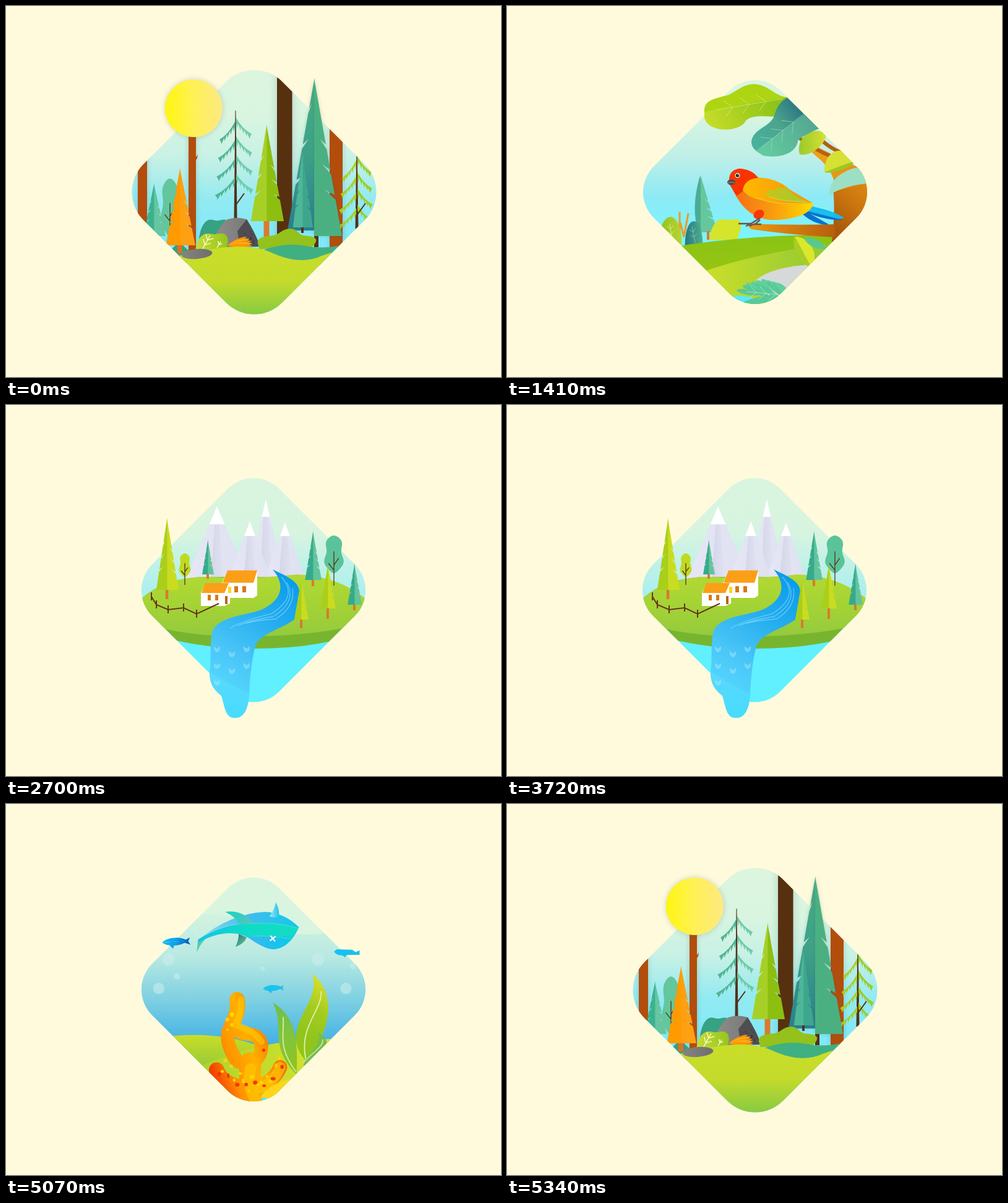
Write an HTML page with a canvas that moves like this. It is 800 px wide and 600 px high and loops after 5.7 s.

```html
<!DOCTYPE html>
<html lang="en">
<head>
<meta charset="utf-8">
<title>Landscapes</title>
<style>
html, body { margin: 0; width: 100%; height: 100%; overflow: hidden; background: #fffadc; }
canvas { display: block; }
</style>
</head>
<body>
<canvas id="stage" width="800" height="600"></canvas>
<script>
const g = document.getElementById('stage').getContext('2d');
const LOOP = 5700, STEP = 30, STEPS = 10, STARTS = [1170, 2460, 3720, 5070];
const SMALL = 0.2, NEAR = 0.917;
const BARK = '#b24d0c', DARK = '#55301a', WOOD = '#d97a30';

// ---- drawing helpers ----
function lin(x0, y0, x1, y1, ...colors) {
  const grad = g.createLinearGradient(x0, y0, x1, y1);
  colors.forEach((c, i) => grad.addColorStop(i / (colors.length - 1), c));
  return grad;
}
const across = (a, b, ...colors) => lin(a, 0, b, 0, ...colors);
const down = (a, b, ...colors) => lin(0, a, 0, b, ...colors);

function shape(d, fill) {
  g.fillStyle = fill;
  g.fill(new Path2D(d));
}
function line(d, color, width = 1) {
  g.strokeStyle = color;
  g.lineWidth = width;
  g.stroke(new Path2D(d));
}
function rect(x, y, w, h, fill) {
  g.fillStyle = fill;
  g.fillRect(x, y, w, h);
}
function oval(x, y, rx, ry, fill, turn = 0) {
  g.fillStyle = fill;
  g.beginPath();
  g.ellipse(x, y, rx, ry, turn, 0, 7);
  g.fill();
}
function inside(s, draw) {
  g.save();
  g.clip(s.frame);
  draw();
  g.restore();
}
function withShadow(blur, draw) {
  g.save();
  g.shadowColor = 'rgba(40,90,80,.24)';
  g.shadowBlur = blur;
  draw();
  g.restore();
}
function random(seed) {
  return () => (seed = (seed * 16807) % 2147483647) / 2147483647;
}

// ---- plants ----
function firSide(x, top, bot, edge, cuts, shift, fill) {
  const w = edge - x, h = bot - top;
  g.beginPath();
  g.moveTo(x, top);
  for (let i = 0; i < cuts; i++) {
    const t = shift + i * (0.9 - shift) / cuts;
    g.lineTo(x + w * t, top + h * t);
    g.lineTo(x + w * t * 0.5, top + h * (t - 0.035));
    g.lineTo(x + w * (t + 0.03), top + h * (t + 0.03));
  }
  g.lineTo(edge, bot);
  g.lineTo(x, bot);
  g.fillStyle = fill;
  g.fill();
}
function fir(x, top, bot, half, cl, cr, trunk, foot, bark = WOOD) {
  rect(x - trunk / 2, bot - 1, trunk, foot - bot + 1, bark);
  firSide(x, top, bot, x + half, 3, 0.45, cr);
  firSide(x + 0.4, top, bot, x - half * 0.9, 3, 0.35, cl);
}
const tealFir = (x, top, bot, half, foot) => fir(x, top, bot, half, '#36aa8b', '#62c39d', 4, foot);
const limeFir = (x, top, bot, half, foot) => fir(x, top, bot, half, '#a9cf1a', '#cadc20', 4, foot);

function bough(x, y, dx, dy, fill) {
  const teeth = 5;
  g.beginPath();
  g.moveTo(x, y);
  g.quadraticCurveTo(x + dx * 0.4, y + dy * 0.7, x + dx, y + dy);
  for (let i = teeth - 1; i >= 0; i--) {
    const f = i / teeth, px = x + dx * f, py = y + dy * f;
    g.lineTo(px + dx * 0.11, py + 9);
    g.lineTo(px + dx * 0.08, py + 17 - f * 5);
    g.lineTo(px, py + 9);
  }
  g.fillStyle = fill;
  g.fill();
}
function pine(x, top, foot, gap, reach, cl, cr) {
  shape(`M${x - 0.5} ${top}h1l2 ${foot - top}h-5z`, DARK);
  for (let i = 0; i < 4; i++) {
    bough(x - 1, top + 18 + i * gap, -reach - i * 2.4, 29, cl);
    bough(x + 1, top + 12 + i * gap, reach + i * 0.8, 26, cr);
  }
  line(`M${x + 1} ${foot - 23}l13 -18`, DARK, 2);
}
function roundTree(x, top, w, h, fill, foot) {
  g.beginPath();
  for (let a = 0; a < 6.28; a += 0.15) {
    const v = Math.sin(a), wave = 0.84 + 0.16 * Math.cos(5 * v - 2.4);
    g.lineTo(x + w / 2 * Math.cos(a) * wave, top + h / 2 * (1 + v));
  }
  g.fillStyle = fill;
  g.fill();
  const t = foot - top - h * 0.42;
  line(`M${x} ${foot}v${-t}m0 ${t * 0.55}l${-t * 0.16} ${-t * 0.2}m${t * 0.16} ${t * 0.05}l${t * 0.14} ${-t * 0.2}`, DARK, 1.3);
}
// lobed half-oval standing on its base; lean moves the top sideways
function bush(x, base, w, h, fill, lobes = 3, lean = 0) {
  g.beginPath();
  for (let i = 0; i <= 40; i++) {
    const a = Math.PI * i / 40, r = 0.9 - 0.1 * Math.cos(2 * lobes * a), up = Math.sin(a) * r;
    g.lineTo(x - w / 2 * Math.cos(a) * r + lean * up, base - h * up);
  }
  g.fillStyle = fill;
  g.fill();
}
// leaf along an axis, with its own bulge and fill on each side
function leaf(x0, y0, x1, y1, a, b, fa, fb = fa) {
  const dx = x1 - x0, dy = y1 - y0, len = Math.hypot(dx, dy);
  for (const [bulge, fill] of [[a, fa], [-b, fb]]) {
    const nx = dy / len * bulge, ny = -dx / len * bulge;
    g.beginPath();
    g.moveTo(x0, y0);
    g.bezierCurveTo(x0 + dx * 0.2 + nx, y0 + dy * 0.2 + ny, x0 + dx * 0.8 + nx, y0 + dy * 0.8 + ny, x1, y1);
    g.fillStyle = fill;
    g.fill();
  }
}
function veins(x0, y0, x1, y1, count, size, color, width = 0.8) {
  const dx = x1 - x0, dy = y1 - y0, len = Math.hypot(dx, dy), ux = dx / len * size, uy = dy / len * size;
  let d = `M${x0} ${y0}L${x1} ${y1}`;
  for (let i = 1; i <= count; i++) {
    const f = i / (count + 1), p = `M${x0 + dx * f} ${y0 + dy * f}`;
    d += `${p}l${ux - uy} ${uy + ux}${p}l${ux + uy} ${uy - ux}`;
  }
  line(d, color, width);
}
function kelp(x, y, tipX, tipY, left, right, fill, vein) {
  const h = y - tipY, mid = (tipX + right) / 2, c = (left + right) / 2;
  shape(`M${tipX} ${tipY}C${right} ${tipY + h * 0.2} ${right} ${tipY + h * 0.6} ${x} ${y}C${left} ${tipY + h * 0.6} ${mid} ${tipY + h * 0.35} ${tipX} ${tipY}`, fill);
  line(`M${mid - 4} ${tipY + h * 0.2}C${mid} ${tipY + h * 0.4} ${c - 12} ${tipY + h * 0.6} ${x - 1} ${y - 5}`, vein, 2);
}

// ---- forest ----
function forest(s) {
  inside(s, () => {
    rect(200, 100, 400, 400, down(110, 380, '#dcf5df', '#d9f5e0', '#c8f1e5', '#93eaf1', '#7fe9f9'));
    withShadow(14, () => rect(438, 90, 24.5, 292, '#57300f'));
    withShadow(10, () => {
      rect(213, 240, 15, 110, BARK);
      rect(295, 205, 12, 190, BARK);
      rect(523, 190, 21, 200, BARK);
    });
    shape('M306 246l4 -6l-1 6l-3 5z', BARK);
    roundTree(265, 279, 33, 94, '#63c69c', 372);
    fir(239, 287, 372, 19, '#3bb28e', '#65c6a0', 4, 380, DARK);
    bush(333, 392, 58, 56, '#36a183', 2, 10);
    bush(280, 415, 70, 30, '#3a9e7d');
    fir(281, 262, 387, 25, '#ff9a00', '#ff9f12', 8, 400, '#df6f26');
    pine(371, 169, 344, 30, 25, '#4fb594', '#6fcba8');
    fir(421, 192, 348, 28, '#a6d026', '#8cbf10', 9, 384);
    pine(567, 231, 360, 26, 23, '#a9cd20', '#9dcb1d');
    rect(498, 370, 7, 20, DARK);
  });
  withShadow(6, () => {
    firSide(498.5, 117, 363, 455, 3, 0.2, down(120, 365, '#44ad86', '#3ea087', '#2a7d8f'));
    firSide(498, 117, 372, 543, 3, 0.42, '#4ab081');
  });
  fir(479, 236, 358, 17, '#4db797', '#3ea68d', 4, 367, DARK);
  inside(s, () => {
    shape('M328 392Q346 352 358 345Q373 340 389 345L411 389Z', across(335, 395, '#8e8e8c', '#777'));
    shape('M389 345Q402 365 411 389H378L374 364z', '#504d50');
    const rnd = random(7);
    for (let i = 0; i < 16; i++) oval(380 + rnd() * 22, 364 + rnd() * 22, 0.7, 0.7, '#222');
    bush(451, 393, 105, 33, '#94c11b', 3, 8);
    shape('M415 395Q450 382 485 388Q510 394 545 386V420H415z', '#3fb081');
    bush(329, 402, 60, 41, across(305, 360, '#c6dd39', '#92c51b'), 2, 10);
    veins(317, 394, 330, 371, 2, 7, '#fff8d8', 1.4);
    veins(341, 391, 347, 381, 1, 4, '#fff8d8', 1.4);
    for (let i = 0; i < 5; i++) {
      const a = 0.75 - i * 0.2;
      leaf(359, 387, 359 + 41 * Math.cos(a) - i * 0.5, 387 - 20 * Math.sin(a), 4, 4, i % 2 ? '#ffb01f' : '#ff9500');
    }
    shape('M250 410Q310 397 340 392Q390 384 425 397Q475 421 510 404Q530 396 560 394V510H250z', down(390, 500, '#c9de29', '#c4db2b', '#86ca43'));
    oval(308.5, 401, 25, 8, across(284, 333, '#868481', '#706e6d'), -0.08);
  });
  withShadow(10, () => oval(303.5, 165.5, 46.5, 46.5, across(257, 350, '#fff60f', '#fff156', '#fde983')));
}

// ---- bird ----
function bird(s) {
  inside(s, () => {
    rect(210, 110, 380, 380, down(120, 370, '#daf5e1', '#d6f4e2', '#bfefe8', '#8eeaf5', '#7bf4ff'));
    line('M279 372V333M286 374l-6 -24M286 372l7 -37', '#ee9c22', 3);
    bush(264, 386, 46, 45, across(246, 284, '#8ec21d', '#bdd334'), 1);
    veins(267, 378, 263, 352, 2, 5, '#e5f3a0');
    shape('M312 274Q296 330 310 366H326z', '#4aad93');
    firSide(313, 274, 366, 340, 3, 0.45, '#66c79c');
    rect(323, 364, 4, 14, WOOD);
    bush(302, 388, 36, 40, across(285, 318, '#22747e', '#55b18e'), 1);
    veins(304, 383, 299, 357, 2, 5, '#83d0b1');
    bush(349, 378, 56, 40, '#d5e52b', 2, 12);
    // meadow
    shape('M210 400Q360 370 520 370H590V500H210z', down(370, 435, '#8ac414', '#98c414'));
    shape('M310 432Q400 400 515 386V500H310z', across(330, 490, '#c9de2a', '#98cb32'));
    shape('M403 443Q430 420 500 418V480H430z', '#d6d9da');
    shape('M350 471Q390 462 415 482H360z', '#57eafa');
    // trunk and foliage
    shape('M525 382Q531 330 527 297Q533 277 585 262V390z', lin(520, 350, 585, 280, '#a9570b', '#c9740f', '#e08c12'));
    shape('M528 300Q535 278 508 250L476 222H490L585 270V285z', lin(480, 225, 580, 290, '#f0a51c', '#e38a12'));
    line('M468 210Q496 232 524 243M498 206Q517 229 545 239', '#b8600e', 6);
    shape('M386 352Q460 355 530 353V374Q455 370 395 361z', across(390, 530, '#ed9911', '#b65f0c'));
    shape('M520 306Q522 282 541 271Q560 258 583 261V287Q546 290 520 306z', '#9be0c4');
    leaf(473, 240, 516, 206, 25, 14, across(473, 515, '#9bcb28', '#d5df35'));
    leaf(513, 269, 566, 249, 34, 8, '#d5e134', '#9bc821');
    leaf(465, 373, 492, 423, 22, 14, '#dbe72c', '#a8ce26');
    leaf(480, 375, 516, 392, 8, 9, '#58c98f');
    // fern
    for (let i = 0; i < 7; i++) {
      oval(389 + i * 9, 463 - (i % 2) * 5, 18, 4, '#58c997', 0.2 + i * 0.1);
      oval(397 + i * 8, 451 + Math.abs(i - 3) * 2, 5, 13, '#61cf9e', -0.85);
    }
    shape('M381 479Q420 462 458 470V485H380z', '#58c997');
    veins(450, 468, 387, 462, 3, 11, '#b0ecc8');
  });
  // large leaves
  shape('M319 174C317 151 337 150 358 144C376 135 387 122 409 128C425 132 433 145 453 148L432 179C411 178 389 176 383 190C365 207 315 202 319 174z', lin(325, 190, 432, 150, '#c6dc29', '#8cc416'));
  shape('M319 171C318 151 337 150 358 144C376 135 387 122 409 128C425 132 433 145 453 148Q382 157 319 171z', '#aed512');
  veins(445, 150, 338, 168, 3, 13, '#d9e980');
  inside(s, () => {
    shape('M453 148L504 198Q484 206 470 217C468 250 394 250 395 219C398 198 427 195 432 177Q437 157 453 148z', lin(395, 215, 475, 155, '#49b19c', '#4ca48c', '#276f80'));
    shape('M402 234L482 174L505 198Q484 206 470 217C468 239 440 247 414 242z', lin(420, 235, 490, 190, '#62c99f', '#55a992'));
    veins(480, 174, 412, 228, 3, 14, '#94d5bf');
  });
  // tail, body and wing
  leaf(470, 323, 545, 343, 7, 9, '#16bdef');
  leaf(470, 325, 520, 353, 0, 11, '#0872cd');
  leaf(478, 330, 543, 346, 0, 6, '#0872cd');
  shape('M360 284C358 262 390 257 405 277C430 279 470 306 495 320C490 340 455 346 430 346C395 346 372 320 360 284z', across(370, 490, '#f67016', '#f99c0d', '#ffd600'));
  shape('M360 289C356 270 366 263 378 263Q397 265 406 278Q385 283 381 300L371 307Q365 298 360 289z', '#fa3400');
  shape('M381 298Q384 278 410 278Q437 279 457 297L493 318Q444 324 412 314Q391 311 381 298z', across(382, 465, '#ffb900', '#f69b09'));
  shape('M414 304Q424 303 423 296Q435 302 436 292Q449 299 449 292Q463 308 484 316Q446 320 414 304z', across(414, 480, '#c7c61c', '#a6c82b'));
  line('M401 310Q443 325 488 317M423 309Q449 317 482 316', '#dfd74b', 0.9);
  // face
  oval(362.5, 285, 6.5, 4.5, '#514c4b');
  line('M357 286Q363 284 368 286', '#b9aca8', 0.8);
  oval(372.5, 274, 4.2, 4.2, '#c7d3c8');
  oval(372.5, 274, 2.6, 2.6, '#172024');
  oval(373.4, 273, 0.8, 0.8, '#fff');
  // legs
  oval(407, 337, 9, 7, '#f6380b', -0.5);
  line('M409 343L394 352H374M395 352L386 356M409 346L401 353H411M401 352L392 356', '#67534b', 2.3);
}

// ---- valley ----
function peak(x, top, half, foot, snow) {
  const cap = half * (snow - top) / (foot - top);
  shape(`M${x} ${top}L${x - half} ${foot}h${half * 2}z`, across(x - half, x + half, '#e6e7f5', '#dfe0f1'));
  shape(`M${x - 4} ${snow}h8L${x + 10} ${foot}h-20z`, across(x - 10, x + 10, '#d4d6e8', '#e0e1f1'));
  shape(`M${x} ${top}L${x - cap} ${snow}h${cap * 2}z`, '#fff');
}
function valley(s) {
  inside(s, () => {
    rect(210, 110, 380, 380, down(118, 300, '#d9f5df', '#d7f4e0', '#acefee'));
    peak(420, 152, 30, 285, 181);
    peak(341, 164, 52, 285, 193);
    peak(451, 190, 31, 277, 212);
    peak(394, 188, 36, 285, 212);
    rect(210, 355, 380, 140, '#60f0ff');
    shape('M210 322Q250 277 330 278H470Q545 277 590 322V360Q520 394 400 394Q290 394 210 360z', '#78b52f');
    shape('M210 322Q250 277 330 278Q400 282 470 274Q545 277 590 322V349Q515 373 400 374Q285 377 210 348z', down(274, 375, '#b3d933', '#a4d335', '#94ca3e'));
  });
  fir(260, 183, 299, 19, '#a9cf1a', '#cadc20', 4.5, 314);
  roundTree(289, 240, 21, 38, '#c0da20', 291);
  tealFir(326, 218, 274, 10, 281);
  tealFir(496, 204, 283, 14, 293);
  roundTree(530, 211, 35, 61, '#5bc39a', 292);
  tealFir(563, 256, 323, 12, 332);
  // river and fall
  const pool = 'Q391 506 370 506C354 506 354 488 348 470C334 459 329 449 329 431';
  shape(`M431 266C454 277 473 285 474 301L466 347C443 364 411 369 403 390Q395 420 393 467${pool}C332 413 329 382 334 365C344 342 385 341 413 331C442 318 455 294 431 266z`,
    lin(470, 285, 350, 480, '#0a9bea', '#25adef', '#4ac5f7', '#55dcff'));
  shape(`M329 431Q359 452 393 467${pool}z`, down(430, 506, '#5cd8fc', '#46dcff'));
  for (let i = 0; i < 3; i++) {
    line(`M${445 + i * 9} ${278 + i * 9}Q${474 - i * 3} ${310 + i * 8} ${428 + i * 4} ${338 + i * 4}Q${385 + i * 10} 348 ${362 + i * 13} ${361 - i * 4}`, 'rgba(145,223,255,.6)', 1.3);
  }
  for (let i = 0; i < 7; i++) {
    const x = 341 + (i % 3) * 24, y = 394 + (i % 3 === 1) * 8 + Math.floor(i / 3) * 27;
    shape(`M${x - 5} ${y - 4}l5 4l5 -4q1 9 -5 10q-6 -1 -5 -10z`, 'rgba(161,232,255,.5)');
  }
  limeFir(477, 280, 347, 12, 361);
  limeFir(520, 258, 329, 13, 346);
  // houses
  shape('M349 288L358 268L406 268V308L400 312H349z', '#fff');
  shape('M358 267.5H406L400 287.5H350z', '#fb9f18');
  shape('M315 304L323 288L354 304L359 290L362 302V321L353 325H315z', '#fff');
  shape('M322 288H360L353 304H316z', '#fb9f18');
  for (let i = 0; i < 2; i++) {
    rect(369 + i * 13, 293, 6, 10, '#d47a17');
    rect(326 + i * 12, 307, 5, 9, '#d47a17');
  }
  rect(359, 294, 5, 10, '#ffd51c');
  rect(354, 309, 4, 13, '#b76523');
  // fence
  const rail = [[235, 310], [243, 323], [262, 331], [287, 328], [308, 338], [344, 321]];
  line('M' + rail.join('L'), '#68351e', 2);
  rail.slice(0, -1).forEach(([x, y]) => line(`M${x} ${y - 7}v13`, '#68351e', 2));
}

// ---- sea ----
function fish(x, y, k, fill) {
  g.save();
  g.translate(x, y);
  g.scale(k, k);
  leaf(-24, 1, 20, -2, 9, 9, fill);
  shape('M14 -2L25 -8L22 -1L26 5L14 1z', fill);
  shape('M-12 5L-5 12L-2 5z', fill);
  g.restore();
}
function limb(d, width, color) {
  g.lineCap = 'round';
  line(d, color, width);
  g.lineCap = 'butt';
}
function coral() {
  const body = lin(322, 445, 440, 405, '#f33600', '#ff9300', '#ffb000', '#f57905');
  limb('M371 318Q375 338 360 366', 27, body);
  limb('M360 366Q345 385 370 425Q395 442 411 415Q423 380 385 378Q368 376 362 360', 24, body);
  limb('M394 430V480', 38, body);
  limb('M335 442Q345 470 390 474', 27, body);
  limb('M447 437Q436 464 400 474', 25, body);
  oval(395, 492, 56, 34, body);
  const glow = 'rgba(255,200,0,.65)';
  limb('M378 318Q380 340 368 362Q400 372 414 392', 11, glow);
  limb('M395 440Q388 465 402 492', 20, glow);
  limb('M447 437Q436 464 412 474', 18, glow);
  const rnd = random(42);
  for (let i = 0; i < 22; i++) {
    const f = (i + 0.5) / 22, x = 337 + f * 116, y = 488 - Math.abs(x - 395) * 0.7 - rnd() * 32;
    oval(x, y, 2 + rnd() * 2.4, 2 + rnd() * 2.4, i % 3 ? '#ffd500' : '#f43600');
  }
  for (let i = 0; i < 4; i++) oval(362 - (i % 2) * 8, 344 + i * 9, 4 - i * 0.6, 4 - i * 0.6, '#ffd500');
  oval(418, 407, 2.9, 2.9, '#f43600');
}
function sea(s) {
  inside(s, () => {
    rect(200, 100, 400, 400, '#d9f5df');
    shape('M200 182Q300 150 400 181Q470 213 535 198L600 190V500H200z', down(165, 395, '#d4f3df', '#b8e9e2', '#7ed0e2', '#42b1e5'));
    const bubble = 'rgba(205,239,235,.55)';
    for (const side of [-1, 1]) {
      oval(398 + side * 165, 298, 10, 10, bubble);
      oval(382 + side * 132, 247, 11, 11, bubble);
      oval(420 + side * 155, 268 - side * 9, 5.5, 5.5, bubble);
    }
    oval(416, 263, 4, 4, bubble);
    shape('M235 384Q340 371 415 402L350 480H235z', down(380, 435, '#cadd29', '#98cb35'));
    shape('M300 438Q420 381 570 388V500H300z', lin(310, 430, 500, 410, '#acd42f', '#d2e12b'));
    kelp(476, 450, 434, 323, 426, 478, down(325, 448, '#6fbf4f', '#84c43a', '#8fc41b'), '#d5eca5');
    kelp(493, 427, 503, 272, 440, 543, lin(480, 370, 531, 290, '#91c51b', '#a5cc20', '#d6df2b'), '#deefae');
    kelp(488, 435, 513, 376, 492, 538, '#75bd4c', '#c7e694');
    coral();
    shape('M412 490Q425 468 467 457L475 470L440 500z', '#ffd51a');
    shape('M413 492Q420 488 427 495L417 500z', '#57eafa');
  });
  // whale
  leaf(290, 191, 306, 213, 5, -2, '#caf1e4');
  shape('M302 212L328 200Q309 213 300 234z', lin(300, 232, 316, 205, '#60cc94', '#46d1c1'));
  shape('M302 213Q358 166 420 163Q454 164 480 190Q464 227 435 229Q414 226 391 209Q352 188 302 213z', across(302, 480, '#8edced', '#42bdf0', '#12c9e8'));
  shape('M303 211Q347 185 392 184Q442 180 479 192L466 209Q432 210 402 212Q356 187 303 217z', across(303, 480, '#10c5e7', '#0edcc6', '#15dbc3'));
  shape('M391 207Q427 202 469 208Q455 228 435 229Q418 229 391 207z', across(400, 465, '#35baf0', '#09c9e9'));
  line('M323 200Q360 180 393 184Q440 180 478 192M399 206Q428 204 469 211', '#62e6c1', 0.8);
  shape('M350 163Q381 159 400 183L376 186Q368 171 350 163z', lin(350, 165, 390, 185, '#12d8c4', '#4fc6bd'));
  shape('M439 146Q446 157 445 172Q435 174 428 171Q437 160 439 146z', across(428, 445, '#a6e8f1', '#22c2ef'));
  shape('M374 202L388 208Q384 219 368 225Q374 213 374 202z', lin(370, 205, 385, 221, '#267e79', '#66bd9d'));
  line('M430 205l8 10M439 206l-10 8', '#fff', 2.4);
  fish(263, 216, 1, across(-24, 26, '#17bdf4', '#0b9ee9', '#0757bb'));
  fish(434.5, 298, 0.75, '#18c2ee');
  shape('M542 233L547 229L574 230L580 234L587 231V239L565 239L561 243L557 240Q545 240 542 233z', '#18c1ef');
}

// ---- playback ----
const SCENES = [
  { draw: forest, x: 401, y: 301, base: 1 },
  { draw: bird, x: 401, y: 301, base: NEAR },
  { draw: valley, x: 400, y: 299.3, base: NEAR },
  { draw: sea, x: 400, y: 300, base: 1 }
];
for (const s of SCENES) {
  const half = 158.4 * s.base, box = new Path2D();
  box.roundRect(-half, -half, half * 2, half * 2, 64 * s.base);
  s.frame = new Path2D();
  s.frame.addPath(box, new DOMMatrix().translate(s.x, s.y).rotate(45));
}
const ease = u => u * u * (3 - 2 * u);

// a scene shrinks, is swapped at the midpoint, and the next one grows
function pose(t) {
  let index = 0, scale = 1;
  STARTS.forEach((start, i) => {
    if (t < start) return;
    const half = STEPS / 2, k = Math.min(STEPS, Math.floor((t - start) / STEP) + 1);
    index = k < half ? i : (i + 1) % SCENES.length;
    scale = 1 - (1 - SMALL) * ease(1 - Math.abs(k - half) / half);
  });
  return { index, scale };
}
let last = '';
function render() {
  const { index, scale } = pose(performance.now() % LOOP);
  const key = index + ':' + scale;
  if (key !== last) {
    last = key;
    const s = SCENES[index], k = scale / s.base;
    g.setTransform(1, 0, 0, 1, 0, 0);
    rect(0, 0, 800, 600, '#fffadc');
    g.setTransform(k, 0, 0, k, s.x * (1 - k), s.y * (1 - k));
    s.draw(s);
  }
  requestAnimationFrame(render);
}
render();
</script>
</body>
</html>
```
